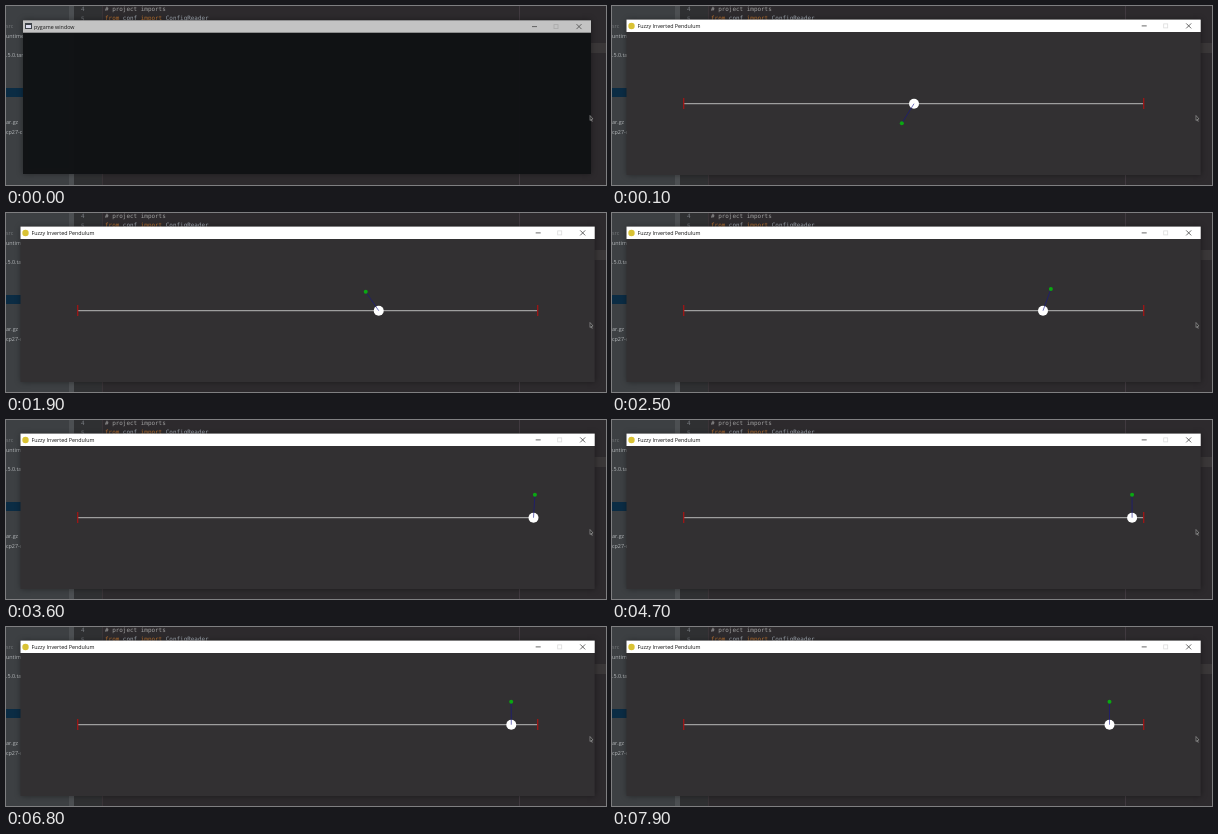
Write an HTML page with a canvas that moves like this. It is 600x179 px and loops after 8 s.

```html
<!DOCTYPE html>
<html lang="en">
<head>
<meta charset="utf-8">
<title>Fuzzy Inverted Pendulum</title>
<style>
html, body { margin: 0; width: 100%; height: 100%; overflow: hidden; background: #2d2b2d; }
canvas { display: block; }
</style>
</head>
<body>
<canvas id="stage" width="600" height="179"></canvas>
<script>
const ctx = document.getElementById('stage').getContext('2d');
const LOOP = 8000, STEP = 100, ROD = 23, TRACK_Y = 97.7, LEFT = 71.7, RIGHT = 531.7;
const UI = '"Open Sans", "Noto Sans", sans-serif';
const MONO = '"DejaVu Sans Mono", monospace';

// time in ms, cart x, rod angle in degrees clockwise from hanging
const KEYS = [
  [100, 302, 32], [300, 298, 8], [600, 286, -38], [900, 293.5, -20],
  [1200, 321.5, 26], [1500, 345, 78], [1800, 365, 130], [2100, 390, 172],
  [2500, 431, 200], [2700, 455, 199], [3000, 490, 196], [3300, 521, 190],
  [3500, 529.5, 185], [3600, 527.5, 183.5], [4500, 521.5, 180], [7900, 497.5, 180]
];

function slope(i, c) {
  const a = KEYS[Math.max(i - 1, 0)], b = KEYS[Math.min(i + 1, KEYS.length - 1)];
  return (b[c] - a[c]) / (b[0] - a[0]);
}

// cubic Hermite curve through the keys
function sample(t, c) {
  let i = 0;
  while (i < KEYS.length - 2 && t >= KEYS[i + 1][0]) i++;
  const a = KEYS[i], b = KEYS[i + 1], h = b[0] - a[0], u = (t - a[0]) / h;
  const u2 = u * u, u3 = u2 * u;
  return a[c] * (2 * u3 - 3 * u2 + 1) + b[c] * (3 * u2 - 2 * u3)
    + h * (slope(i, c) * (u3 - 2 * u2 + u) + slope(i + 1, c) * (u3 - u2));
}

function rect(x, y, w, h, color) {
  ctx.fillStyle = color;
  ctx.fillRect(x, y, w, h);
}

function text(str, x, y, size, color, family = UI) {
  ctx.font = `${size}px ${family}`;
  ctx.fillStyle = color;
  ctx.fillText(str, x, y);
  return x + ctx.measureText(str).width;
}

function line(x1, y1, x2, y2, color, width = 1) {
  ctx.strokeStyle = color;
  ctx.lineWidth = width;
  ctx.beginPath();
  ctx.moveTo(x1, y1);
  ctx.lineTo(x2, y2);
  ctx.stroke();
}

function disc(x, y, r, color) {
  ctx.fillStyle = color;
  ctx.beginPath();
  ctx.arc(x, y, r, 0, 2 * Math.PI);
  ctx.fill();
}

function codeLine(parts, y) {
  let x = 99;
  parts.forEach((part, i) => {
    x = text(part, x, y, 5.95, i % 2 ? '#a4adb6' : '#bd7430', MONO);
  });
}

function drawEditor() {
  rect(0, 0, 600, 179, '#2d2a2d');
  rect(0, 0, 68, 179, '#3d4043');
  rect(63, 0, 5, 179, '#4c4f52');
  rect(68, 0, 28, 179, '#2f3032');
  line(96.5, 0, 96.5, 179, '#3a3438');
  line(513.5, 0, 513.5, 179, '#413a40');
  rect(585, 37, 15, 10, '#3a3738');
  rect(0, 82, 17, 9, '#0b2c44');
  text('src', 0, 22, 5.4, '#75787b');
  text('untime', 0, 32, 5.4, '#b4b7ba');
  text('.5.0.tar', 0, 51, 5.4, '#b4b7ba');
  text('ar.gz', 0, 118, 5.4, '#b4b7ba');
  text('cp27-c', 0, 128, 5.4, '#b4b7ba');
  text('4', 75, 4.5, 5.95, '#777b80', MONO);
  text('5', 75, 14.5, 5.95, '#777b80', MONO);
  text('# project imports', 99, 4.5, 5.95, '#a0a0a0', MONO);
  codeLine(['from', ' conf ', 'import', ' ConfigReader'], 14);
  codeLine(['from', ' world ', 'import', ' World'], 24);
}

function drawWindow(x, y, w, h, title, bar, body) {
  ctx.save();
  ctx.shadowColor = 'rgba(0,0,0,.4)';
  ctx.shadowBlur = 6;
  rect(x, y, w, h, body);
  ctx.restore();
  rect(x, y, w, 12.4, bar);
  const mid = y + 6.3, right = x + w;
  text(title, x + 11, mid + 2, 5.35, '#111');
  line(right - 59, mid, right - 54, mid, '#444', 0.8);
  ctx.strokeStyle = 'rgba(0,0,0,.14)';
  ctx.strokeRect(right - 37, mid - 2, 4, 4);
  line(right - 14.5, mid - 2.5, right - 9.5, mid + 2.5, '#444', 0.8);
  line(right - 14.5, mid + 2.5, right - 9.5, mid - 2.5, '#444', 0.8);
}

function drawPendulum(t) {
  const x = sample(t, 1), a = sample(t, 2) * Math.PI / 180;
  const bobX = x - ROD * Math.sin(a), bobY = TRACK_Y + ROD * Math.cos(a);
  line(LEFT, TRACK_Y, RIGHT, TRACK_Y, '#b8b8b8');
  line(LEFT, 92, LEFT, 103, '#a01616', 1.3);
  if (x < 525.5) line(RIGHT, 92, RIGHT, 103, '#a01616', 1.3);
  disc(x, TRACK_Y, 5, '#fff');
  line(x, TRACK_Y, bobX, bobY, 'rgba(20,20,140,.6)');
  disc(bobX, bobY, 2, '#0aa812');
}

function drawPointer() {
  ctx.beginPath();
  ctx.moveTo(584, 109.5);
  ctx.lineTo(584, 114.5);
  ctx.lineTo(585.3, 113.5);
  ctx.lineTo(587, 113);
  ctx.closePath();
  ctx.fillStyle = '#222';
  ctx.fill();
  ctx.strokeStyle = '#aaa';
  ctx.lineWidth = 0.6;
  ctx.stroke();
  line(585.3, 113.5, 586.2, 115.5, '#aaa', 0.8);
}

function draw(t) {
  drawEditor();
  if (t < STEP) {
    // window still fading in
    ctx.globalAlpha = 0.96;
    drawWindow(17, 14.3, 568, 153.7, 'pygame window', '#cacaca', '#101214');
    ctx.globalAlpha = 1;
    rect(19, 17, 7, 6, '#3c4248');
    rect(20, 19, 5, 3, '#dde');
  } else {
    drawWindow(14.5, 13.6, 574.2, 155.4, 'Fuzzy Inverted Pendulum', '#fff', '#323032');
    disc(19.5, 20, 3.2, '#d9c234');
    drawPendulum(t);
  }
  drawPointer();
}

const start = performance.now();
function tick() {
  const t = (performance.now() - start) % LOOP;
  draw(Math.floor(t / STEP) * STEP);
  requestAnimationFrame(tick);
}
tick();
</script>
</body>
</html>
```
